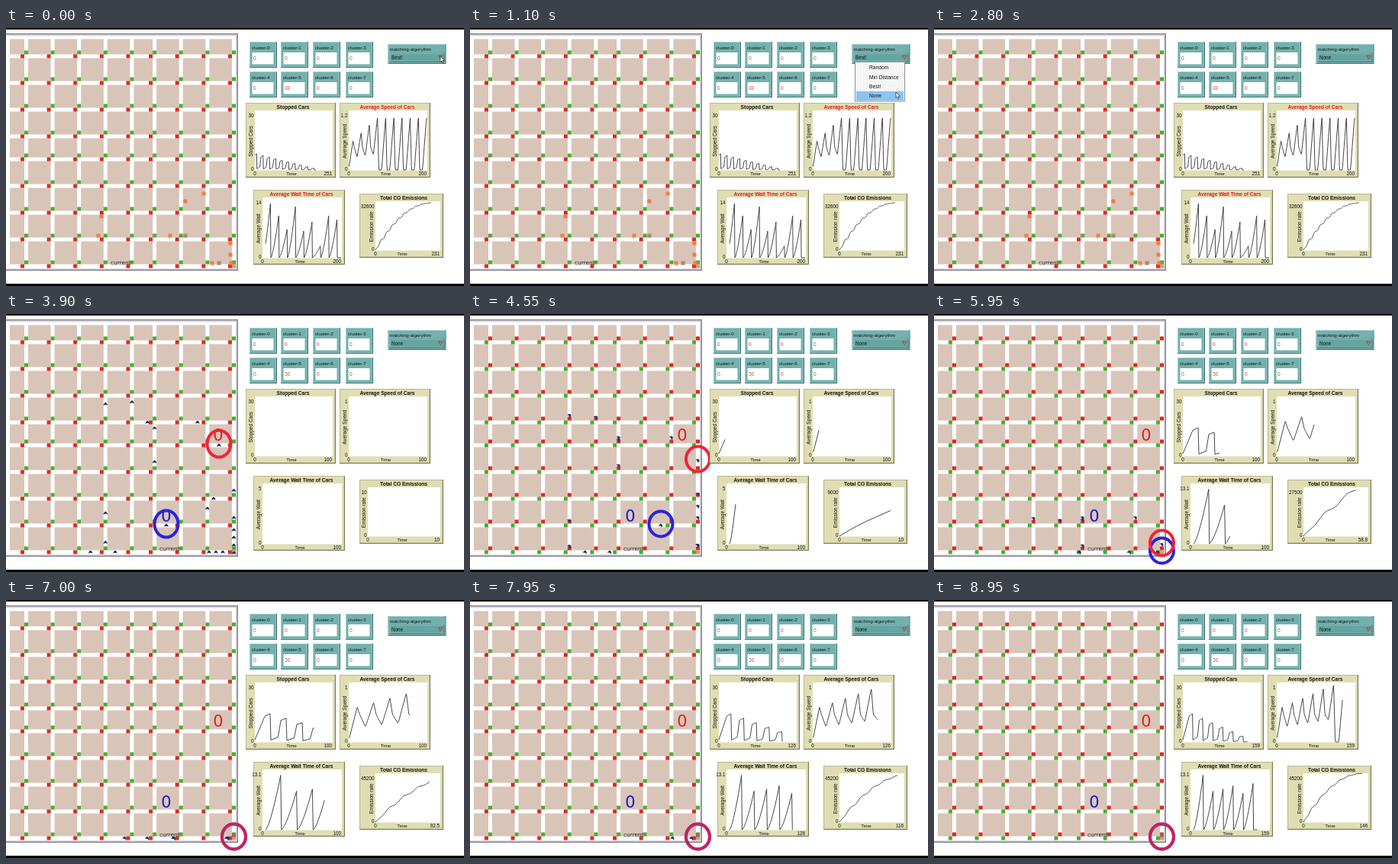
Recreate the animation shown at these times as an HTML page with a canvas. Size 600 px wide and 338 px high, loop 9000 ms.

```html
<!DOCTYPE html>
<html lang="en">
<head>
<meta charset="utf-8">
<title>Traffic grid simulation</title>
<style>
html, body { margin: 0; width: 100%; height: 100%; overflow: hidden; background: #fff; }
canvas { display: block; width: 600px; height: 338px; }
</style>
</head>
<body>
<canvas id="stage"></canvas>
<script>
const LOOP = 9000, SETUP = 3300, RINGS = 3550, START = 4260, TICKS_PER_MS = 0.0286;
const MENU_OPEN = 350, MENU_PICK = 1500, CURSOR_OUT = 1850, PHASE = 21, OLD_TICKS = 200;
const SANS = '"Liberation Sans", Arial, sans-serif', WIDE = '"DejaVu Sans", sans-serif';
const TAN = '#d9c5b8', GREEN = '#45b02f', RED = '#d92a26', ORANGE = '#f87c42', GREY = '#a58a78';
const TEAL = '#74b1ad', NAVY = '#20366b';

const canvas = document.getElementById('stage');
const ratio = window.devicePixelRatio || 1;
canvas.width = 600 * ratio;
canvas.height = 338 * ratio;
const c = canvas.getContext('2d');
c.scale(ratio, ratio);

const clamp = (v, lo, hi) => Math.min(hi, Math.max(lo, v));
const range = n => [...Array(n).keys()];

// Roads lie seven patches apart, except for one gap of six.
const roads = (start, patch, narrow) => range(9).map(k => start + patch * (7 * k - (k > narrow)));
const roadX = roads(26.5, 4.945, 4), roadY = roads(37, 5, 3);
const [LAST_X, LAST_Y] = [roadX[8], roadY[8]];

// Value at x on straight lines through [x, y] points.
function lerpPoints(points, x) {
  const i = clamp(points.findIndex(p => p[0] >= x), 1, points.length - 1);
  const [[x0, y0], [x1, y1]] = [points[i - 1], points[i]];
  return y0 + (y1 - y0) * clamp((x - x0) / (x1 - x0), 0, 1);
}

function seeded(seed) {
  return () => (seed = seed * 16807 % 2147483647) / 2147483647;
}

// --- Measurements: each follows the traffic light cycle ---

function stoppedCars(t, { amp, cycles, lead }) {
  const k = Math.floor((t + lead) / PHASE), p = (t + lead) % PHASE / PHASE;
  const early = k === 0 && !lead ? 0.2 : 0;
  return amp * Math.max(0, 1 - k / cycles) * lerpPoints([[0, 0.08], [0.45 - early, 0.2 + early], [0.62, 0.9], [1, 1]], p);
}

function averageSpeed(t, { gain, top, late }) {
  const u = t / PHASE - 0.52, k = Math.floor(u);
  const peak = i => Math.min(top, 0.6 + gain * i);
  const low = k < 0 ? 0.05 : k < late ? 0.26 + 0.03 * k : 0;
  const mid = k < late ? 0.47 : 0;
  return lerpPoints([[0, peak(k)], [0.16, mid], [0.5, low], [1, peak(k + 1)]], u - k);
}

function waitTime(t, { peaks, period, lead }) {
  const k = Math.floor((t + lead) / period);
  return (peaks[k] || 0) * ((t + lead) % period / (period - 1)) ** 1.4;
}

function emission(t, { total, end }) {
  const ripple = 0.03 * Math.min(1, t / 20) * (1 - t / end) * Math.sin((t - 14) / PHASE * 2 * Math.PI);
  return total * (1 - (1 - Math.min(1, t / end)) ** 2 + ripple);
}

const plots = [
  { title: 'Stopped Cars', side: 'Stopped Cars', box: [314, 98, 118, 98], area: [326, 108, 102, 78.5], left: 326, w: 100, top: 111,
    curve: stoppedCars, x: 100, y: [30], run: { amp: 15, cycles: 6.3, lead: 0 },
    old: { x: 251, y: 30, amp: 8.6, cycles: 10, lead: 14 } },
  { title: 'Average Speed of Cars', side: 'Average Speed', box: [437, 98, 119, 98], area: [449, 108, 103, 78.5], left: 449, w: 102, top: 110, hot: true,
    curve: averageSpeed, x: 100, y: [1], run: { gain: 0.08, top: 1, late: 5 },
    old: { x: 200, y: 1.2, gain: 0.17, top: 1.1, late: 3 } },
  { title: 'Average Wait Time of Cars', side: 'Average Wait', box: [324, 212, 120, 98], area: [336, 222, 104, 79.5], left: 340, w: 99, top: 229, hot: true,
    curve: waitTime, x: 100, y: [5, 8, 13.1], run: { peaks: [13, 9.2, 9.7, 10.5, 8.7, 11], period: PHASE, lead: 0 },
    old: { x: 200, y: 14, peaks: [13.8, 10.7, 7.2, 13, 6.8, 9.1, 3, 10.7, 9.7], period: 22, lead: 8 } },
  { title: 'Total CO Emissions', side: 'Emission rate', box: [463, 217, 110, 84], area: [474, 227, 95, 64.5], left: 484, w: 84, top: 227,
    curve: emission, x: 10, y: [10, 9000, 18400, 27500, 37100, 45200], run: { total: 45000, end: 134 },
    old: { x: 231, y: 32600, total: 31500, end: 201 } }
];

// --- Traffic: drive right, turn down at a chosen road, then follow the bottom road to the corner ---

const downIsGreen = tick => tick < 1 || Math.floor(tick / PHASE) % 2 === 1;

function drive(x, y, across, turn) {
  const path = [{ x, y, across }];
  for (let tick = 1; tick <= 140; tick++) {
    const pos = across ? x : y, lines = across ? roadX : roadY;
    const crossing = lines.some(r => pos < r - 5 && pos + 5 >= r - 5);
    if (!crossing || across !== downIsGreen(tick)) {
      if (across) x = Math.min(x + 5, y < LAST_Y - 3 ? turn : LAST_X);
      else y = Math.min(y + 5, LAST_Y);
    }
    if (across && x >= turn && y < LAST_Y - 3) across = false;
    else if (!across && y >= LAST_Y) across = true;
    path.push({ x, y, across, gone: x > LAST_X - 2 && y > LAST_Y - 4 });
  }
  return path;
}

const random = seeded(41);
const redCar = drive(279, roadY[4], true, LAST_X);
const blueCar = drive(210, roadY[7], true, roadX[7]);
const cars = [redCar, blueCar,
  ...range(14).map(i => {
    const col = 8 - Math.floor(random() ** 1.5 * 6), row = 8 - Math.floor(random() * 7);
    const back = 7 + random() * 20, across = i % 3 === 0;
    return across ? drive(roadX[col] - back, roadY[row], true, roadX[col])
      : drive(roadX[col], roadY[row] - back, false, roadX[col]);
  }),
  ...range(4).map(i => drive(LAST_X, 283 + 10 * i, false, LAST_X)),
  ...range(3).map(i => drive(266 + 9 * i, LAST_Y, true, LAST_X))];

const parked = [[259, 217], [235, 227], [125, 247], [121, 272], [215, 272], [294, 282], [294, 297], [295, 308], [270, 308]];
const parkedGrey = [[235, 272], [279, 308]];

// --- Drawing helpers ---

const rect = (x, y, w, h, color) => { c.fillStyle = color; c.fillRect(x, y, w, h); };
const square = (x, y, color) => rect(x - 2.5, y - 2.5, 5, 5, color);

function text(s, x, y, { size = 6.3, color = '#111', align = 'left', bold = false, family = SANS } = {}) {
  c.font = `${bold ? 'bold ' : ''}${size}px ${family}`;
  c.fillStyle = color;
  c.textAlign = align;
  c.fillText(s, x, y);
}

function panel(x, y, w, h, fill, light, dark) {
  rect(x, y, w, h, dark);
  rect(x, y, w - 1, h - 1, light);
  rect(x + 1, y + 1, w - 2.5, h - 2.5, fill);
}

function trace(points, closed) {
  c.beginPath();
  for (const [x, y] of points) c.lineTo(x, y);
  if (closed) c.closePath();
}

function stroke(color, width) {
  c.strokeStyle = color;
  c.lineWidth = width;
  c.lineJoin = 'round';
  c.stroke();
}

// --- Scene parts ---

// Axis range that widens by a quarter whenever a tick falls outside it.
function widen(max, tick) {
  for (let i = 1; i <= tick; i++) if (i > max) max = i * 1.25;
  return max;
}

function drawPlot(p, tick, fresh) {
  const [bx, by, bw, bh] = p.box;
  let [ax, ay, aw, ah] = p.area;
  const bottom = ay + ah, mid = bx + bw / 2;
  const last = fresh ? tick : OLD_TICKS;
  const values = range(last + 1).map(t => p.curve(t, fresh ? p.run : p.old));
  const peak = Math.max(...values);
  const xMax = fresh ? widen(p.x, tick) : p.old.x;
  const yMax = fresh ? p.y.find(v => v >= peak) || p.y[p.y.length - 1] : p.old.y;
  const indent = yMax > 100 ? 10 : 0;
  ax += indent;
  aw -= indent;

  panel(bx, by, bw, bh, '#dfdeb3', '#b9b894', '#77775c');
  rect(ax, ay, aw, ah, '#fff');
  text(p.title, mid + 3, ay - 2, { size: 6.6, bold: true, align: 'center', color: p.hot && !fresh ? '#e21b1b' : '#111' });
  text(yMax, ax - 1.5, ay + 8.5, { align: 'right' });
  text('0', ax - 1.5, bottom, { align: 'right' });
  text('0', ax, bottom + 6.5, { align: 'center' });
  text('Time', mid + 1, bottom + 6, { align: 'center', size: 6.2 });
  text(Number(xMax.toPrecision(3)), ax + aw - 1, bottom + 6.5, { align: 'right' });
  c.save();
  c.translate(ax - 3.5, (ay + bottom) / 2 + 1);
  c.rotate(-Math.PI / 2);
  text(p.side, 0, 0, { size: 6.6, align: 'center' });
  c.restore();

  if (!last) return;
  const height = bottom - p.top - 0.5;
  trace(values.map((v, t) => [p.left + t / xMax * p.w, bottom - 0.5 - v / yMax * height]));
  stroke('#333', 0.9);
}

function drawGrid(downGreen) {
  rect(0, 7, 304, 311, '#85858f');
  rect(0, 8.5, 302.5, 308, '#dadae2');
  rect(0, 10.5, 301, 304.5, '#fff');
  const spans = (lines, first) => lines.map((r, i) => [i ? lines[i - 1] + 2.5 : first, r - 2.5]);
  for (const [y0, y1] of spans(roadY, 14.5))
    for (const [x0, x1] of spans(roadX, 5)) rect(x0, y0, x1 - x0, y1 - y0, TAN);
  for (const y of roadY)
    for (const x of roadX) {
      square(x, y - 5, downGreen ? GREEN : RED);
      square(x - 5, y, downGreen ? RED : GREEN);
    }
  square(LAST_X, LAST_Y, '#e09a62');
}

function drawCar({ x, y, across }, moving) {
  c.save();
  c.translate(x, y);
  if (moving) c.rotate(across ? 0.35 : 0.9);
  trace([[-2.8, 1.8], [-2, -0.6], [-0.8, -2], [0.8, -2], [2, -0.6], [2.8, 1.8], [1, 1], [-1, 1]], true);
  c.fillStyle = NAVY;
  c.fill();
  c.restore();
}

function ring({ x, y }, ry, color) {
  c.beginPath();
  c.ellipse(x, y - 2, 15.5, ry, 0, 0, Math.PI * 2);
  stroke(color, 4);
}

function drawRun(time, tick) {
  const at = car => car[Math.min(tick, car.length - 1)];
  for (const car of cars) if (!at(car).gone) drawCar(at(car), tick > 0);
  if (tick > 70) square(LAST_X, 308, '#85705f');
  text('0', 278, 166, { size: 21, color: '#d9241f', align: 'center', family: WIDE });
  text('0', 210, 272, { size: 21, color: '#1a1ad0', align: 'center', family: WIDE });
  if (time < RINGS) return;
  const ry = tick > 0 ? 16.5 : 17.5;
  ring(at(blueCar), ry, '#2a22e0');
  c.globalAlpha = at(redCar).gone ? 0.8 : 1;
  ring(at(redCar), ry, '#ef2435');
  c.globalAlpha = 1;
}

function drawMonitors() {
  [319, 360, 402, 445].forEach((x, col) => [18, 57].forEach((y, row) => {
    const id = row * 4 + col;
    panel(x, y, 36, 34, TEAL, '#a3d0cc', '#34706e');
    rect(x + 3.5, y + 14, 28, 15.5, '#fff');
    text('cluster-' + id, x + 3, y + 9.5, { size: 6.2 });
    text(id === 5 ? '30' : '0', x + 5, y + 23.5, { size: 6.6, color: '#c4532f' });
  }));
}

function drawCursor(x, y) {
  c.save();
  c.translate(x, y);
  trace([[0, 0], [0, 7.5], [1.7, 6], [3, 8.7], [4.2, 8.1], [3, 5.5], [5.3, 5.3]], true);
  c.fillStyle = '#fff';
  c.fill();
  stroke('#222', 0.7);
  c.restore();
}

function drawChooser(time) {
  panel(500.5, 21, 76, 26, TEAL, '#a3d0cc', '#34706e');
  text('matching-algorythm', 502.5, 29.5, { size: 6.2 });
  panel(502.5, 32.5, 72, 12.5, '#64a4a1', '#8fc2bf', '#356f6d');
  text(time < MENU_PICK ? 'Best!' : 'None', 505, 40.5);
  trace([[566.5, 36], [572, 36], [569.2, 40.5]], true);
  stroke('#c03a35', 1);

  const x = lerpPoints([[400, 569], [1000, 558], [1550, 558], [CURSOR_OUT, 606]], time);
  const y = lerpPoints([[400, 37], [1000, 84], [1550, 84], [CURSOR_OUT, 74]], time);
  if (time >= MENU_OPEN && time < MENU_PICK) {
    const step = 12.3, hover = Math.floor((y - 45.5) / step);
    rect(504, 44, 66, 52.5, '#8e8e8e');
    rect(505, 45, 64, 50.5, '#f5f5f5');
    if (hover >= 0) rect(506, 46 + hover * step, 62, step, '#8cc4ee');
    ['Random', 'Min Distance', 'Best!', 'None'].forEach((s, i) => text(s, 523, 54.3 + i * step, { size: 6.7 }));
  }
  if (time < CURSOR_OUT) drawCursor(x, y);
}

function draw(time) {
  const fresh = time >= SETUP;
  const tick = Math.max(0, Math.floor((time - START) * TICKS_PER_MS));
  rect(0, 0, 600, 338, '#fff');
  drawGrid(downIsGreen(tick));
  text('current', fresh ? 201 : 137, 310, { size: 7.4, color: '#222', family: WIDE });
  if (fresh) drawRun(time, tick);
  else {
    parked.forEach(([x, y]) => square(x, y, ORANGE));
    parkedGrey.forEach(([x, y]) => square(x, y, GREY));
  }
  drawMonitors();
  for (const p of plots) drawPlot(p, tick, fresh);
  drawChooser(time);
  rect(0, 0, 600, 2, '#000');
  rect(0, 335, 600, 3, '#000');
}

const begin = performance.now();
function frame() {
  draw(Math.floor((performance.now() - begin) % LOOP / 50) * 50);
  requestAnimationFrame(frame);
}
frame();
</script>
</body>
</html>
```
